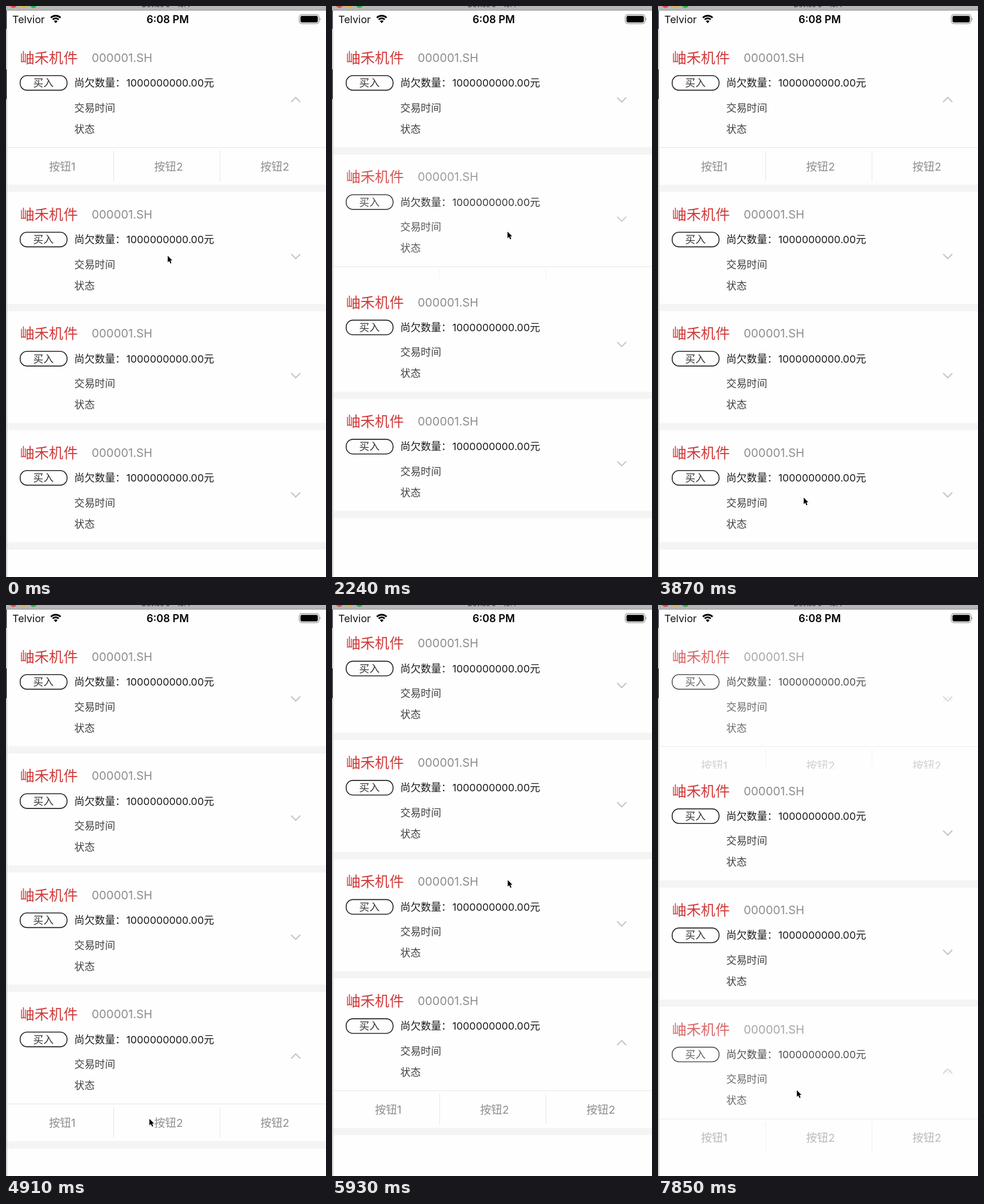
Write an HTML page that moves like this. It is 560 px wide and 999 px high and loops after 8000 ms.

```html
<!DOCTYPE html>
<html lang="zh-CN">
<head>
<meta charset="utf-8">
<title>Accordion list</title>
<style>
  html, body { margin: 0; width: 100%; height: 100%; overflow: hidden; background: #fefefe; }
  svg { display: block; width: 560px; height: 999px; }
  text { font-family: Inter, "Noto Sans CJK SC", "Noto Sans CJK", sans-serif; }
</style>
</head>
<body>
<svg id="stage" viewBox="0 0 560 999" xmlns="http://www.w3.org/2000/svg"></svg>
<script>
const LOOP = 8000, TICK = 148, FADE = 300;
const TOP = 51.5, ROW = 208.5, EXTRA = 65.5, GAP = 13, BODY = ROW - GAP;
const PAPER = "#fefefe", LINE = "#e6e6e6";

// Places the pointer rests at; tap is the row pressed there.
const STOPS = [
  { at: 100, x: 283, y: 437, tap: 1 },
  { at: 1184, x: 106, y: 493 },
  { at: 2000, x: 307, y: 398, tap: 1 },
  { at: 2739, x: 315, y: 219, tap: 0 },
  { at: 3900, x: 255, y: 860, tap: 3 },
  { at: 4884, x: 251, y: 899 },
  { at: 5476, x: 291, y: 617 },
  { at: 6451, x: 345, y: 174, tap: 0 },
  { at: 7675, x: 243, y: 849, tap: 3 }
];
const PULL = { from: 5096, release: 5580, by: 101 };

const text = (str, x, y, size, fill, more = "") =>
  `<text x="${x}" y="${y + size * 0.365}" font-size="${size}" fill="${fill}" ${more}>${str}</text>`;
const rect = (x, y, w, h, fill, more = "") =>
  `<rect x="${x}" y="${y}" width="${w}" height="${h}" fill="${fill}" ${more}/>`;
const middle = 'text-anchor="middle"';

function strip() {
  const button = (label, i) =>
    (i ? rect(2 + 186 * i, BODY + 6, 1, 54, LINE) : "") +
    text(label, 98.5 + 186 * i, 229, 19.3, "#8e8e8e", middle);
  return `<g class="strip">${rect(2, BODY, 558, EXTRA, PAPER)}${rect(2, BODY, 558, 1, LINE)}
    ${["按钮1", "按钮2", "按钮2"].map(button).join("")}</g>`;
}

function cell(open) {
  const h = ROW + (open ? EXTRA : 0);
  const arrow = open ? "M499 116.5l8-8 8 8" : "M499 108.5l8 8 8-8";
  return `<g class="${open ? "open" : "shut"}" ${open ? "" : 'clip-path="url(#low)"'}>
    ${rect(2, 0, 558, h - GAP, PAPER)}
    ${rect(2, h - GAP, 558, GAP, "#f4f4f4", 'class="gap"')}
    ${text("岫禾机件", 24.5, 39, 25.3, "#d03b3b")}
    ${text("000001.SH", 150, 39, 20.3, "#8c8c8c")}
    ${rect(24.8, 70.3, 82, 25.6, "none", 'rx="12" stroke="#222" stroke-width="1.6"')}
    ${text("买入", 65.5, 83, 17.9, "#333", middle)}
    ${text("尚欠数量：", 119.5, 83, 17.9, "#1a1a1a")}
    ${text("1000000000.00元", 210.5, 83, 17.9, "#1a1a1a")}
    ${text("交易时间", 119.5, 126.5, 17.9, "#404040")}
    ${text("状态", 119.5, 163.5, 17.9, "#404040")}
    <path d="${arrow}" fill="none" stroke="#c3c3c3" stroke-width="2"/>
    ${strip()}</g>`;
}

const arc = r => {
  const d = r * Math.SQRT1_2;
  return `<path d="M${87 - d} ${29 - d}A${r} ${r} 0 0 1 ${87 + d} ${29 - d}"/>`;
};

const statusBar = `
  ${text("Telvior", 11, 23, 17.9, "#111")}
  <g fill="none" stroke="#000" stroke-width="3">${arc(12)}${arc(7.4)}</g>
  <path d="M87 30l-3.2-3.4a4.6 4.6 0 0 1 6.4 0z"/>
  ${text("6:08 PM", 283, 23, 18.2, "#000", middle + ' font-weight="600"')}
  ${rect(513.2, 15.2, 34.6, 15.6, "none", 'rx="4.5" stroke="#8c8c8c" stroke-width="1.2"')}
  ${rect(515.3, 17.3, 30.4, 11.4, "#000", 'rx="2.6"')}
  <path d="M549 20.5q2.6 2.5 0 5z" fill="#8c8c8c"/>`;

const chrome = `
  ${rect(0, 0, 2, 999, "#e9e9e9")}
  ${rect(0, 8, 1, 32, "#26263a")}
  ${rect(0, 111, 1.5, 52, "#0c0c0c")}
  ${rect(1, 8, 1, 991, "#b3b3b3")}
  ${rect(0, 0, 560, 8, "#b6b6b6")}${rect(0, 7, 560, 1, "#979797")}
  ${["#e9493f", "#e8b02c", "#2bb53c"].map((c, i) =>
    `<circle cx="${13 + 17.5 * i}" cy="-2.5" r="6" fill="${c}"/>`).join("")}
  ${text("Device 5 - 10.4", 280, -2, 12, "#333", middle)}`;

const stage = document.getElementById("stage");
stage.innerHTML = `
  <clipPath id="low">${rect(0, 0, 560, ROW, "#000")}</clipPath>
  ${rect(0, 0, 560, 999, PAPER)}
  <g id="list">${`<g class="row">${cell(false)}${cell(true)}</g>`.repeat(4)}</g>
  ${statusBar}${chrome}
  <g id="pointer"><path d="M0 0V13L3 10.2 5.2 15.4 7.4 14.4 5.3 9.4H9.2Z" transform="scale(.88)"
    fill="#000" stroke="#fff" stroke-width="1.6" paint-order="stroke"/></g>`;

const list = document.getElementById("list");
const pointer = document.getElementById("pointer");
const rows = [...list.children].map(el => ({
  el,
  open: el.querySelector(".open"),
  shut: el.querySelector(".shut"),
  gap: el.querySelector(".open .gap"),
  strip: el.querySelector(".shut .strip")
}));

// Tapping the open row closes it; tapping another one opens that instead.
const states = [{ at: -FADE, open: 0 }];
for (const { at, tap } of STOPS) {
  if (tap === undefined) continue;
  const last = states[states.length - 1].open;
  states.push({ at, open: tap === last ? -1 : tap });
}

const ease = u => (1 - Math.cos(Math.PI * Math.min(1, Math.max(0, u)))) / 2;

function display(el, on) {
  el.setAttribute("display", on ? "inline" : "none");
}

function fade(el, alpha) {
  display(el, alpha > 0);
  el.setAttribute("opacity", alpha);
}

function drawRows(t) {
  const n = states.filter(s => s.at <= t).length - 1;
  const now = states[n];
  const before = states[Math.max(0, n - 1)];
  const p = ease((t - now.at) / FADE);

  let y = TOP;
  rows.forEach((row, i) => {
    const is = i === now.open, was = i === before.open;
    const [next, last] = is ? [row.open, row.shut] : [row.shut, row.open];
    const changing = p < 1 && is !== was;
    row.el.setAttribute("transform", `translate(0 ${y})`);
    row.el.append(next);
    fade(next, changing ? p : 1);
    fade(last, changing ? 1 - p : 0);
    display(row.strip, changing);
    display(row.gap, !(changing && is));
    y += ROW + EXTRA * (is * p + was * (1 - p));
  });
}

// Rests for the first quarter of each leg, and arrives early.
function drawPointer(t) {
  const n = STOPS.filter(s => s.at <= t).length;
  const a = STOPS[Math.max(0, n - 1)];
  const b = STOPS[Math.min(n, STOPS.length - 1)];
  const u = a === b ? 0 : ease(((t - a.at) / (b.at - a.at) - 0.25) / 0.55);
  pointer.setAttribute("transform", `translate(${a.x + (b.x - a.x) * u} ${a.y + (b.y - a.y) * u})`);
}

function drawScroll(t) {
  const pulled = ease((t - PULL.from) / 380) - ease((t - PULL.release) / 500);
  list.setAttribute("transform", `translate(0 ${-PULL.by * pulled})`);
}

// The screen refreshes in even ticks, so the time is snapped to them.
const born = performance.now();
function loop() {
  const now = (performance.now() - born) % LOOP;
  const t = Math.min(Math.floor(now / TICK), Math.floor(LOOP / TICK) - 1) * TICK;
  drawRows(t);
  drawPointer(t);
  drawScroll(t);
  requestAnimationFrame(loop);
}
loop();
</script>
</body>
</html>
```
